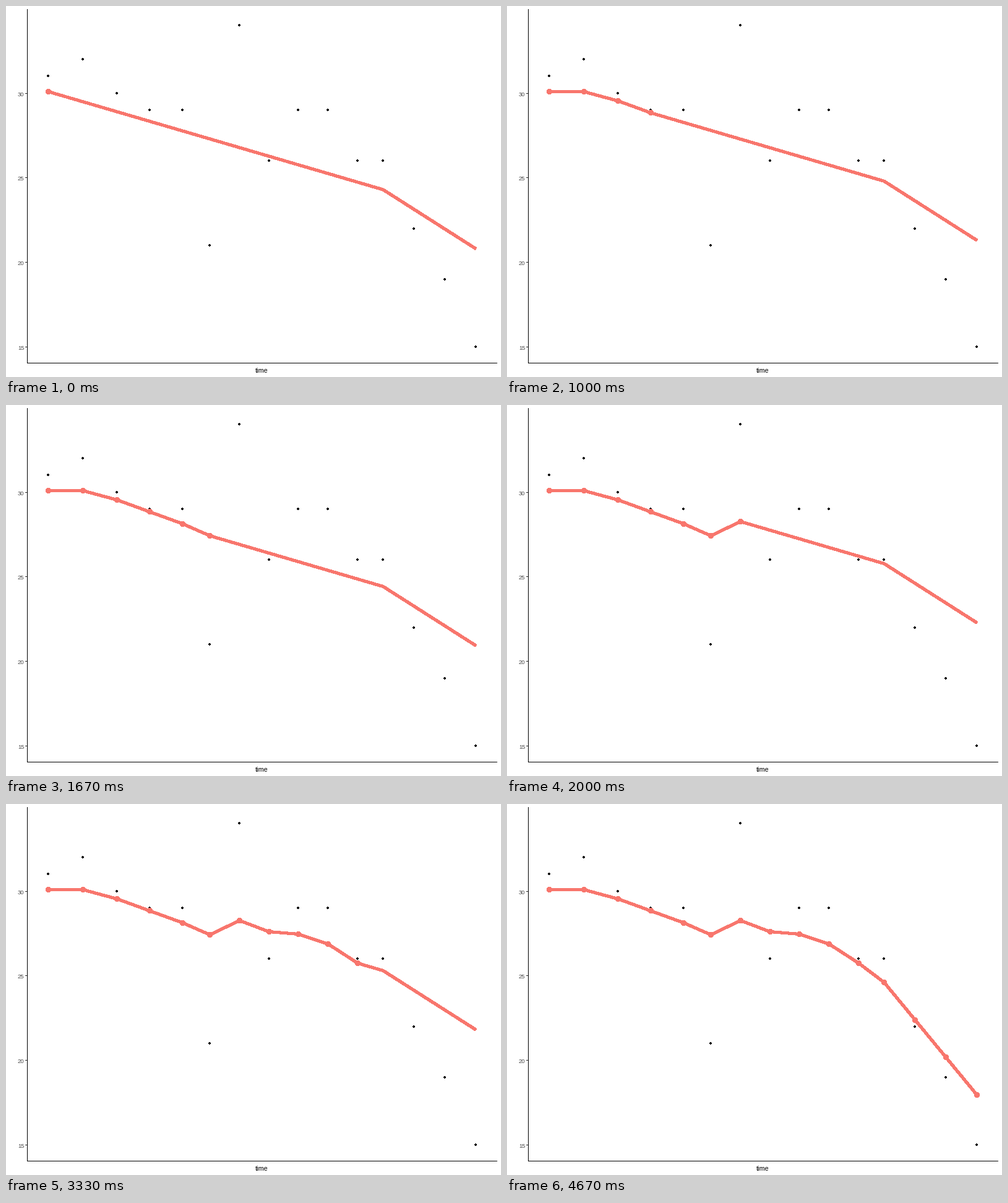
Write a matplotlib script that moves like this. It is 800 px wide and 600 px high and loops after 5 s.

```python
import numpy as np
import matplotlib.pyplot as plt
from matplotlib.animation import FuncAnimation
from matplotlib.patches import Circle, Rectangle

WIDTH, HEIGHT, DPI = 800, 600, 100
PX = 72 / DPI
CORAL = "#F8766D"
STEPS, FRAMES, LOOP_MS = 15, 250, 5000


def through(*points):
    """One value per time step, interpolated between a few key points."""
    return np.interp(np.arange(STEPS), *zip(*points))


def value_y(value):
    return int(551.43 - 27.345 * (value - 15))


# Horizontal positions of the measurements, in pixels.
times = through((0, 68), (2, 179), (4, 285), (5, 329), (10, 568), (11, 609), (14, 759))

# Slowly falling measurements with a short damped swing in the middle.
observed = through((0, 31), (1, 32), (3, 29), (9, 29), (10, 26), (11, 26), (14, 15))
observed[5:8] -= 8 * (-0.62) ** np.arange(3)
observed = np.rint(observed)

# Estimated level at each step, in pixels, and the drift that forecasts follow.
filtered = through((1, 138.5), (2, 153.5), (5, 211.5), (6, 188.5), (7, 206.5),
                   (8, 210.5), (9, 226.5), (11, 288.5), (14, 470.5))
trend = 0.293 * times + 0.345 * np.maximum(0, times - times[11])

fig = plt.figure(figsize=(WIDTH / DPI, HEIGHT / DPI), dpi=DPI, facecolor="white")
ax = fig.add_axes([0, 0, 1, 1])
ax.set_xlim(0, WIDTH)
ax.set_ylim(HEIGHT, 0)
ax.axis("off")


def bar(x, y, width, height, color):
    ax.add_patch(Rectangle((x, y), width, height, fc=color, lw=0, aa=False))


def dot(x, y, radius, color, zorder):
    circle = Circle((x, y), radius, fc=color, lw=0, aa=False, zorder=zorder)
    circle.set_snap(False)
    return ax.add_patch(circle)


def label(x, y, text, size, color, align):
    ax.text(x, y, text, fontsize=size * PX, color=color, ha=align,
            va="baseline", family="Liberation Sans")


bar(34, 5, 1, 573, "black")
bar(34, 577, 760, 1, "black")
for value in range(15, 31, 5):
    y = value_y(value)
    bar(31, y, 3, 1, "#333333")
    label(29.5, y + 5, str(value), 9.5, "#4D4D4D", "right")
label(413.5, 593, "time", 10.7, "black", "center")

for x, value in zip(times, observed):
    dot(round(x), value_y(value), 1.3, "black", 2)

# Without antialiasing every touched pixel is filled, so sizes are set slightly small.
line, = ax.plot([], [], color=CORAL, lw=4.1 * PX, aa=False, zorder=3,
                solid_capstyle="butt", solid_joinstyle="round")
line.set_snap(False)
states = [dot(round(x) + 0.5, np.floor(y) + 0.5, 4, CORAL, 4)
          for x, y in zip(times, filtered)]


def update(frame):
    # The offset makes a step begin on the frame its start time falls in.
    step = int((frame + 0.7) * STEPS / FRAMES)
    forecast = filtered[step] + trend[step + 1:] - trend[step]
    line.set_data(times + 0.5, np.concatenate([filtered[:step + 1], forecast]))
    for i, state in enumerate(states):
        state.set_visible(i <= step)
    return [line, *states]


anim = FuncAnimation(fig, update, frames=FRAMES, interval=LOOP_MS // FRAMES,
                     repeat=True, repeat_delay=0, blit=False)
plt.show()
```
